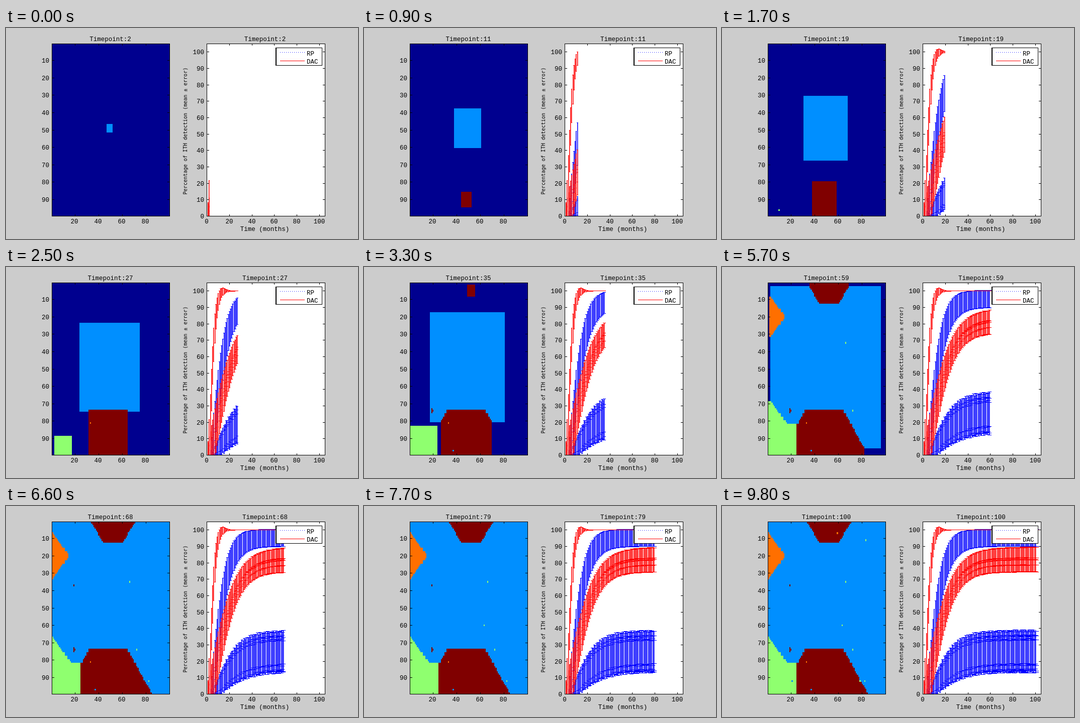
Recreate the animation shown at these times as an HTML page with a canvas. Size 700 by 420 pixels, loop 9900 ms.

```html
<!DOCTYPE html>
<html lang="en">
<head>
<meta charset="utf-8">
<title>Growth map and detection chart</title>
<style>
html, body { margin: 0; width: 100%; height: 100%; overflow: hidden; background: #ccc; }
canvas { display: block; }
</style>
</head>
<body>
<canvas id="stage" width="700" height="420"></canvas>
<script>
const ctx = document.getElementById('stage').getContext('2d');
const STEP = 100, FIRST = 2, STEPS = 99, N = 99;
const TOP = 31, HEIGHT = 343, BOTTOM = TOP + HEIGHT;
const NAVY = '#00008f', SKY = '#008fff', LIME = '#8fff6f', ORANGE = '#ff6f00', MAROON = '#800000';
const BLUE = '#00f', RED = '#f00';

// ---- growth map: square colonies share one slowing clock,
// and each cell goes to the first colony that reaches it
const clock = t => 1.065 * t - .0047 * t * t;

const colonies = [
  { color: MAROON, col: 47, row: 89, birth: 6, speed: .82 },
  { color: LIME, col: 9, row: 95, birth: 18.5, speed: .96 },
  { color: MAROON, col: 51, row: 4, birth: 30, speed: .85 },
  { color: ORANGE, col: 12, row: 19, birth: 39, speed: .9 },
  { color: SKY, col: 48, row: 48, birth: .5, speed: 1 }
];

// Mutations that never spread
const mutants = [
  { t: 27, col: 32, row: 80, color: ORANGE },
  { t: 33, col: 36, row: 96, color: SKY },
  { t: 33, col: 19, row: 73, color: MAROON },
  { t: 34, col: 18, row: 72, color: MAROON, rows: 3 },
  { t: 42, col: 65, row: 34, color: LIME },
  { t: 45, col: 71, row: 73, color: LIME },
  { t: 66, col: 81, row: 91, color: LIME },
  { t: 67, col: 18, row: 36, color: MAROON },
  { t: 74, col: 62, row: 59, color: LIME },
  { t: 87, col: 77, row: 91, color: LIME },
  { t: 89, col: 82, row: 10, color: LIME },
  { t: 94, col: 20, row: 91, color: SKY },
  { t: 96, col: 58, row: 6, color: ORANGE }
];

function arrival(colony, col, row) {
  const d = Math.max(Math.abs(col - colony.col), Math.abs(row - colony.row));
  let t = Math.ceil(colony.birth);
  while (t <= 100 && colony.speed * (clock(t) - clock(colony.birth)) + .5 < d) t++;
  return t;
}

const cells = [];
for (let row = 0; row < N; row++) {
  for (let col = 0; col < N; col++) {
    let cell = { t: Infinity };
    for (const c of colonies) {
      const t = arrival(c, col, row);
      if (t < cell.t) cell = { t, col, row, color: c.color };
    }
    cells.push(cell);
  }
}

const mapX = col => Math.round(91.2 + col * 234 / N);
const mapY = row => Math.floor(TOP + .9 + row * HEIGHT / N);

function fillCell({ t, col, row, color, rows = 1 }, now) {
  if (t > now) return;
  const x = mapX(col), y = mapY(row);
  ctx.fillStyle = color;
  ctx.fillRect(x, y, mapX(col + 1) - x, mapY(row + rows) - y);
}

// ---- error bars: lower and upper ends follow saturating curves
const rise = (max, start, tau, power = 1) => t =>
  max * Math.tanh(Math.pow(Math.max(0, t - start) / tau, power));
const overshoot = t => 2.2 * Math.exp(-Math.pow((t - 13) / 5, 2));
const steepRise = rise(100, 0, 5.9, 1.4);

const bands = [
  { color: BLUE, lo: rise(90, 5.5, 15.3), hi: rise(100.4, 2.6, 13), wobble: .1, inner: [] },
  { color: BLUE, lo: rise(13.6, 12, 26), hi: rise(38.5, 4, 22), wobble: .6, inner: [.05, .18, .79, .88] },
  { color: RED, lo: rise(74.5, 7.5, 20), hi: rise(89.5, -1, 24.5), wobble: .2, inner: [.28, .5, .57] },
  { color: RED, lo: rise(100, 2.5, 5.4), hi: t => steepRise(t) + overshoot(t), wobble: 0, inner: [] }
];

const plotX = v => 399.5 + v * 235 / 105;
const plotY = v => Math.round(BOTTOM - v * HEIGHT / 105);

function drawBar({ color, lo, hi, wobble, inner }, t) {
  const low = lo(t), high = hi(t);
  if (high <= 0) return;
  const x = Math.floor(plotX(t));
  const left = Math.floor(plotX(t * .975)), right = Math.round(plotX(t * 1.025));
  const jitter = seed => low > 0 ? wobble * Math.sin(t * (2.7 + seed)) : 0;
  const cap = (v, seed) => {
    const y = plotY(Math.max(0, v + jitter(seed)));
    ctx.fillRect(left, y, right - left + 1, 1);
    return y;
  };
  ctx.fillStyle = color;
  const top = cap(high, 0), bottom = cap(low, 1);
  ctx.fillRect(x, top, 1.5, bottom - top + 1);
  for (const f of inner) cap(low + f * (high - low), f);
}

function text(s, x, y, align = 'center', font = '12.5px "Liberation Mono"') {
  ctx.font = font + ', monospace';
  ctx.textAlign = align;
  ctx.fillStyle = '#000';
  ctx.fillText(s, x, y);
}

function drawAxes(left, width, xTicks, yTicks, toX, toY, shift) {
  ctx.strokeStyle = '#000';
  ctx.lineWidth = 1;
  ctx.strokeRect(left + .5, TOP + .5, width, HEIGHT);
  for (const v of xTicks) {
    const x = Math.floor(toX(v));
    ctx.fillStyle = '#000';
    ctx.fillRect(x, TOP, 1, 4);
    ctx.fillRect(x, BOTTOM - 3, 1, 4);
    text(v, x + shift, 389);
  }
  for (const v of yTicks) {
    const y = Math.round(toY(v));
    ctx.fillStyle = '#000';
    ctx.fillRect(left, y, 5, 1);
    ctx.fillRect(left + width - 4, y, 5, 1);
    text(v, left - 5, y + 5, 'right');
  }
}

function drawLegend() {
  ctx.fillStyle = '#000';
  ctx.fillRect(536, 39, 93, 36);
  ctx.fillStyle = '#fff';
  ctx.fillRect(538, 40, 90, 34);
  ctx.fillStyle = BLUE;
  for (let x = 545; x < 594; x += 4) ctx.fillRect(x, 48, 1, 1);
  ctx.fillStyle = RED;
  ctx.fillRect(545, 65, 49, 1);
  text('RP', 598, 55, 'left');
  text('DAC', 598, 71, 'left');
}

const range = (from, to, step) =>
  Array.from({ length: (to - from) / step + 1 }, (_, i) => from + i * step);

function drawMap(t) {
  ctx.fillStyle = NAVY;
  ctx.fillRect(92, TOP, 234, HEIGHT);
  for (const cell of cells) fillCell(cell, t);
  for (const mutant of mutants) fillCell(mutant, t);
  drawAxes(91, 234, range(20, 80, 20), range(10, 90, 10),
    v => 91 + (v - .5) * 234 / N, v => TOP + (v - .5) * HEIGHT / N, -1);
  text('Timepoint:' + t, 207.5, 26);
}

function drawChart(t) {
  ctx.fillStyle = '#fff';
  ctx.fillRect(399, TOP, 235, HEIGHT);
  for (let i = 1; i <= t; i++) for (const band of bands) drawBar(band, i);
  drawAxes(399, 235, range(0, 100, 20), range(0, 100, 10), plotX, plotY, 0);
  drawLegend();
  text('Timepoint:' + t, 515, 26);
  text('Time (months)', 514.5, 404);
  ctx.save();
  ctx.translate(360, 205);
  ctx.rotate(-Math.PI / 2);
  text('Percentage of ITH detection (mean ± error)', 0, 0, 'center', '10px "DejaVu Sans Mono"');
  ctx.restore();
}

let shown = 0;
function tick() {
  const t = FIRST + Math.floor(performance.now() / STEP) % STEPS;
  if (t !== shown) {
    shown = t;
    ctx.fillStyle = '#ccc';
    ctx.fillRect(0, 0, 700, 420);
    drawMap(t);
    drawChart(t);
  }
  requestAnimationFrame(tick);
}
tick();
</script>
</body>
</html>
```
